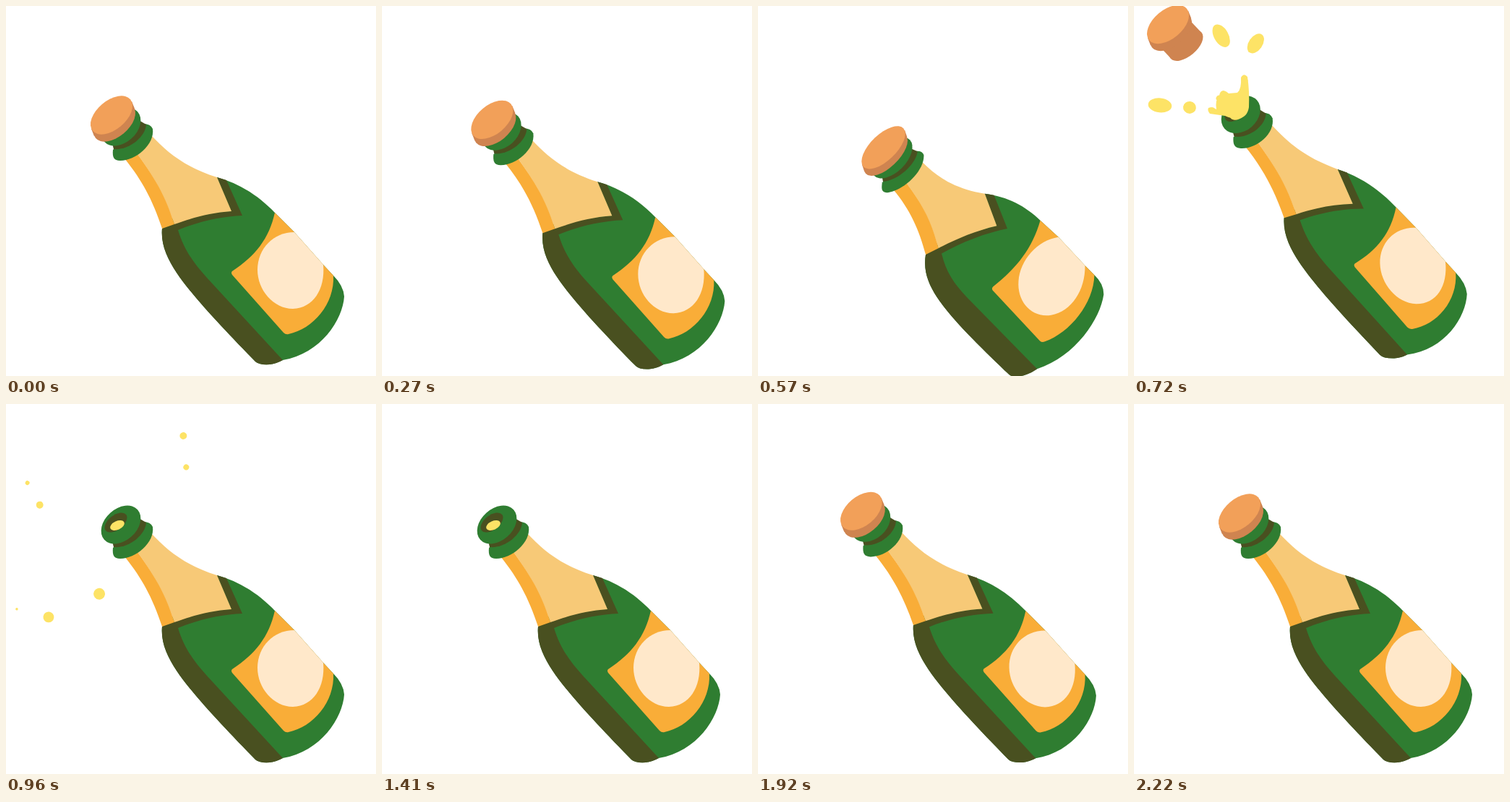
Recreate the animation shown at these times as an HTML page. Size 512 by 512 pixels, loop 2250 ms.

```html
<!DOCTYPE html>
<html lang="en">
<head>
<meta charset="utf-8">
<title>Popping bottle</title>
<style>
  html, body { margin: 0; width: 100%; height: 100%; overflow: hidden; background: #fff; }
  svg { display: block; width: 100%; height: 100%; }
  .green { fill: #2f7d31; }
  .dark { fill: #495020; }
  .amber { fill: #f9ad38; }
  .pale { fill: #f7c977; }
  .cream { fill: #ffe8ca; }
  .side { fill: #cf8450; }
  .face { fill: #f2a059; }
  .fizz { fill: #fde366; }
</style>
</head>
<body>
<svg viewBox="0 0 512 512">
  <g id="bottle">
    <!-- body -->
    <path class="green" d="M216 308C214 330 223 349 236 369C258 402 306 452 345 492Q350 497 365 496Q374 495 383 490C436 481 466 434 468 402Q467 387 453 373L439 358L399 313L372 286C350 263 324 246 292 237Z"/>
    <path class="dark" d="M216 308C246 294 282 286 312 284L292 237L305 241L327 290C298 291 264 299 238 310C246 336 258 354 278 376L383 490Q374 495 365 496Q350 497 345 492C306 452 258 402 236 369C223 349 214 330 216 308Z"/>
    <!-- label -->
    <path class="amber" d="M372 286C364 322 345 346 313 367Q311 369 313 372L384 452Q387 455 391 454C425 447 455 412 453 373L439 358L399 313Z"/>
    <path class="cream" d="M399 313L439 358C442 392 425 418 397 419C370 419 348 393 348 365C348 336 370 313 399 313Z"/>
    <!-- foil -->
    <path class="pale" d="M202 180C222 201 245 222 292 237L312 284C282 286 255 294 233 302C218 258 204 236 182 205Z"/>
    <path class="amber" d="M164 211C190 243 204 272 216 308L233 302C219 258 204 236 182 205Z"/>
    <!-- neck -->
    <path class="green" d="M148 199C147 209 149 214 158 214C179 214 206 192 203 170Q200 163 190 163Z"/>
    <path class="dark" d="M146 186L149 198C170 200 193 181 194 164L182 157Z"/>
    <ellipse class="green" rx="31" ry="22" transform="translate(159 167) rotate(-42)"/>
    <ellipse class="dark" rx="18" ry="10" transform="translate(152 164) rotate(-38)"/>
    <ellipse class="fizz" rx="10.500" ry="6" transform="translate(154 168) rotate(-24)"/>
  </g>
  <path id="splash" class="fizz" d="M103 141Q108 139 114 143Q112 130 118 124Q119 117 124 117Q128 118 131 121L143 120Q149 115 148 99Q152 92 157 98Q160 118 159 140Q157 154 144 156Q134 156 126 152L105 149Q101 144 103 141Z"/>
  <g id="drops" class="fizz"></g>
  <!-- cork, centred on its top face -->
  <g id="cork">
    <g id="plug" class="side">
      <path d="M29 -7L46 11L4 47L-13 29Z"/>
      <ellipse rx="28" ry="15" transform="translate(25 29) rotate(-40)"/>
    </g>
    <path class="side" d="M28 -19L32 -9L-24 29L-28 19Z"/>
    <ellipse class="side" rx="34" ry="20" transform="translate(4 10) rotate(-40)"/>
    <ellipse class="face" rx="34" ry="20" transform="rotate(-40)"/>
  </g>
</svg>
<script>
const LOOP = 2250, SQUASHED = 570, POP = 635, RETURN = 1650;
const MOUTH = { x: 140, y: 150 }, SEAT = { x: 146, y: 151 };
const el = id => document.getElementById(id);
const [bottle, cork, plug, splash] = ['bottle', 'cork', 'plug', 'splash'].map(el);

const { sin, cos, PI } = Math;
const clamp = v => Math.min(1, Math.max(0, v));
const span = (t, from, to) => clamp((t - from) / (to - from));
const mix = (a, b, k) => a + (b - a) * k;
const smooth = k => k * k * (3 - 2 * k);
const backOut = k => 1 + 2.7 * (k - 1) ** 3 + 1.7 * (k - 1) ** 2;
const show = (node, on) => node.setAttribute('visibility', on ? 'visible' : 'hidden');

// Wind up, recoil after the pop, then bounce when the cork lands.
function poseAt(t) {
  let shift, squash, lean = 0;
  if (t < SQUASHED) {
    shift = 6.5 * smooth(span(t, 0, 300));
    lean = squash = smooth(span(t, 270, SQUASHED));
  } else if (t < RETURN) {
    const k = span(t, SQUASHED, 960);
    lean = squash = (1 - k) ** 2 * cos(2 * PI * k);
    shift = 6.5 * squash - 4.4 * sin(PI * k);
  } else {
    const k = span(t, RETURN, 2160);
    squash = 0.25 * (1 - k) * sin(2.8 * PI * k);
    shift = 6 * (1 - k) * sin(2.6 * PI * Math.max(0, k - 0.176));
  }
  return `translate(${415 + shift} ${450 + shift}) rotate(${-45 - 2.4 * lean}) ` +
    `scale(${1 + 0.13 * squash} ${1 - 0.107 * squash}) rotate(45) translate(-415 -450)`;
}

function drawCork(t, pose) {
  const flying = t >= POP && t < RETURN;
  const k = (t - POP) / 85;
  show(cork, !flying || k < 2);
  show(plug, flying && k > 0.25 && k < 2);
  if (flying) {
    const x = SEAT.x - 99 * sin(PI / 2 * clamp(k)), y = SEAT.y - 124 * k;
    cork.setAttribute('transform', `translate(${x} ${y})`);
  } else {
    const size = t < POP ? 1 : mix(0.3, 1, backOut(span(t, RETURN, RETURN + 130)));
    cork.setAttribute('transform', `${pose} translate(${SEAT.x} ${SEAT.y}) scale(${size})`);
  }
}

// thrown to x, y, radius; falling through x, y, radius
const drops = [
  [121, 41, 10, 47, 139, 5],
  [168, 52, 9.5, 249, 87, 4],
  [36, 137, 10, 15, 283, 1.8],
  [77, 140, 8.5, 59, 294, 7.5],
  [153, 104, 4, 245, 44, 5],
  [108, 144, 4, 129, 262, 8],
  [118, 128, 4, 30, 109, 3]
].map(path => {
  const node = document.createElementNS('http://www.w3.org/2000/svg', 'ellipse');
  el('drops').appendChild(node);
  return { path, node };
});

function drawDrop({ path: [x1, y1, r1, x2, y2, r2], node }, t) {
  const rise = span(t, POP, 720), fall = Math.max(0, (t - 720) / 240), k = clamp(fall);
  const life = 1 + r2 / 10, gravity = 60;
  show(node, rise > 0 && fall < life);
  const dx = x1 - MOUTH.x, dy = y1 - MOUTH.y;
  const x = MOUTH.x + dx * rise + (x2 - x1) * fall;
  const y = MOUTH.y + dy * rise + (y2 - y1 - gravity) * fall + gravity * fall ** 2;
  // far-flung drops are longer and lean along their path
  const stretch = Math.max(1, 1 + (Math.hypot(dx, dy) - 60) / 70);
  const tilt = Math.atan(dy / dx) * 135 / PI;
  const r = mix(r1, r2, k) * rise * clamp((life - fall) / (life - 1));
  node.setAttribute('rx', r * mix(stretch, 1, k));
  node.setAttribute('ry', r);
  node.setAttribute('transform', `translate(${x} ${y}) rotate(${tilt})`);
}

function draw(t) {
  const pose = poseAt(t);
  bottle.setAttribute('transform', pose);
  drawCork(t, pose);
  const size = span(t, POP, 700) * (1 - span(t, 730, 860));
  show(splash, size > 0);
  splash.setAttribute('transform', `translate(145 148) scale(${size}) translate(-145 -148)`);
  drops.forEach(d => drawDrop(d, t));
}

const start = performance.now();
function tick() {
  draw((performance.now() - start) % LOOP);
  requestAnimationFrame(tick);
}
tick();
</script>
</body>
</html>
```
